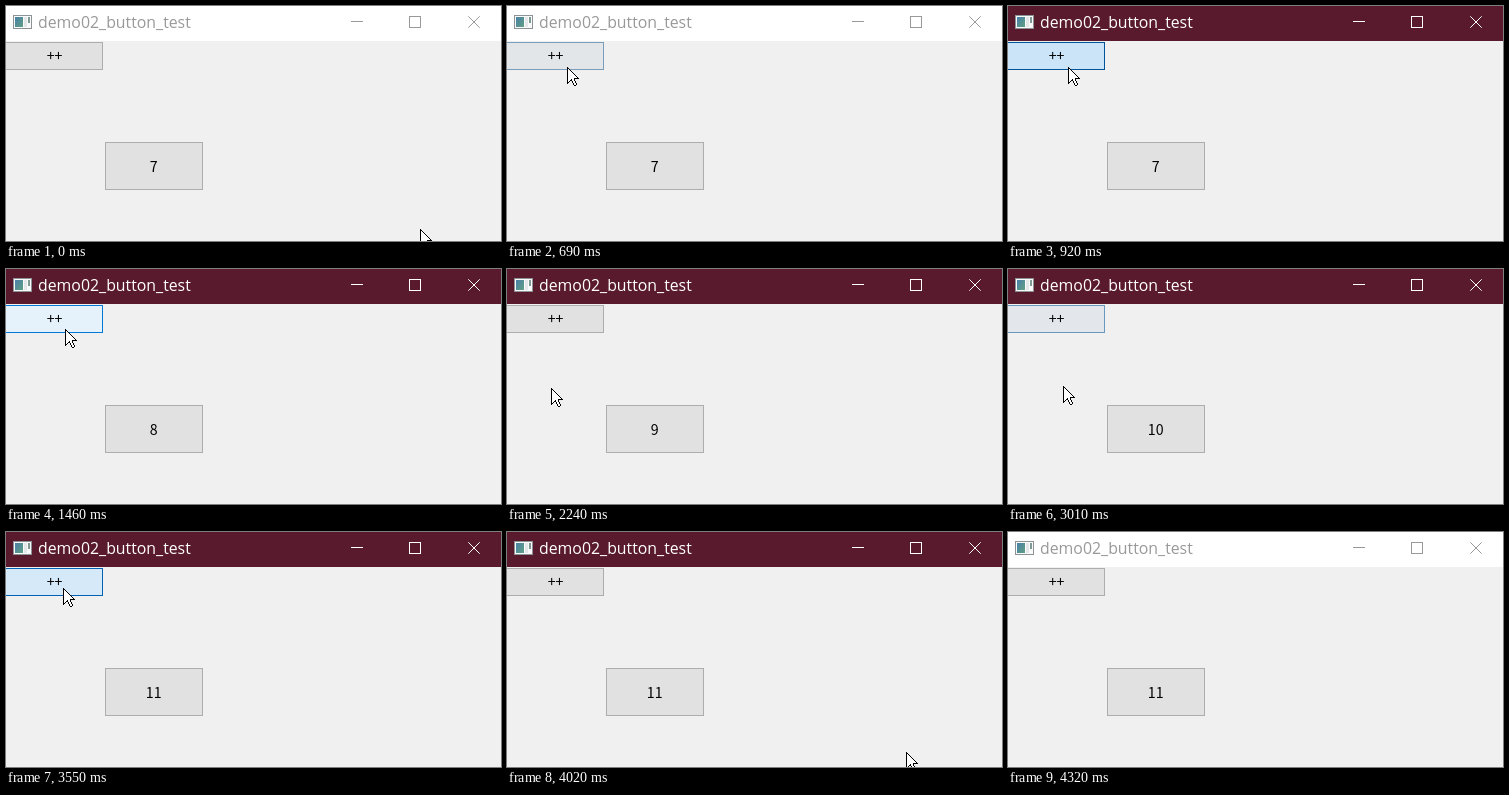
Animation, 495 px wide and 235 px high, one loop 4.4 s. Source, as an HTML page:

```html
<!DOCTYPE html>
<html lang="en">
<head>
<meta charset="utf-8">
<title>Button test</title>
<style>
  html, body { margin: 0; width: 100%; height: 100%; overflow: hidden; background: #f0f0f0; }
  svg { display: block; }
  .title { font: 15.85px "Open Sans", "Noto Sans", sans-serif; }
  .label { font: 14.2px "Noto Sans CJK SC", "Noto Sans CJK JP", "DejaVu Sans", sans-serif; text-anchor: middle; }
</style>
</head>
<body>
<svg width="495" height="235" viewBox="0 0 495 235">
  <defs>
    <linearGradient id="pane" x1="0" y1="0" x2="1" y2="1">
      <stop offset="0" stop-color="#4a7fa8"/>
      <stop offset="1" stop-color="#5fa083"/>
    </linearGradient>
  </defs>
  <rect width="495" height="235" fill="#f0f0f0"/>
  <rect id="bar" width="495" height="35"/>

  <g shape-rendering="crispEdges">
    <rect x="7.5" y="9.5" width="18" height="13" fill="#fafafa" stroke="#8c9296"/>
    <rect x="9" y="11" width="8" height="10" fill="url(#pane)"/>
    <rect x="18" y="11" width="3" height="10" fill="#e4e7e9"/>
    <rect x="22" y="11" width="2" height="6" fill="#7f9a94"/>
  </g>
  <text id="title" class="title" x="32" y="22">demo02_button_test</text>
  <g id="controls" fill="none">
    <path d="M345 15.5h12M403.5 10.5h11v11h-11z" shape-rendering="crispEdges"/>
    <path d="M462.3 10.3l11.4 11.4M473.7 10.3l-11.4 11.4"/>
  </g>

  <rect id="button" x="-.5" y="36.5" width="97" height="27"/>
  <text class="label" x="48.5" y="55">++</text>
  <rect x="99.5" y="136.5" width="97" height="47" fill="#e1e1e1" stroke="#adadad"/>
  <text id="count" class="label" x="147.7" y="166"></text>

  <path id="cursor" fill="#fff" stroke="#000" shape-rendering="crispEdges"
    d="M.5 .5V16.5L4.5 12.5L6.5 17.5L7.5 18.5H8.5L9.5 17.5L7.5 12.5V11.5H11.5Z"/>
</svg>
<script>
const LOOP = 4400, TICKS = 57, STEP = 77.2;
const $ = id => document.getElementById(id);

// Pointer stops: tick, x, y
const stops = [
  [0, 414, 223], [2, 422, 193], [3, 422, 193], [9, 60, 61], [18, 60, 61], [19, 59, 60],
  [25, 59, 60], [29, 44, 119], [33, 57, 60], [36, 57, 60], [39, 55, 117],
  [42, 57, 56], [46, 57, 56], [50, 340, 164], [53, 420, 240]
];
const presses = [11, 23, 34, 44], HOLD = 2;

// Idle, hover and pressed colours
const fills = [[225, 225, 225], [229, 241, 251], [204, 228, 247]];
const edges = [[173, 173, 173], [0, 120, 215], [0, 84, 153]];

const clamp = (v, lo, hi) => Math.min(hi, Math.max(lo, v));
const ease = p => p * p * (3 - 2 * p);

function pointer(k) {
  const i = stops.findIndex(s => s[0] > k);
  if (i < 0) return stops.at(-1).slice(1);
  const [t0, ...from] = stops[i - 1], [t1, ...to] = stops[i];
  const p = ease((k - t0) / (t1 - t0));
  return from.map((v, n) => Math.round(v + (to[n] - v) * p));
}

// The button fades towards its current state, faster when pressed
function nextLevel(level, k) {
  const [x, y] = pointer(k);
  const down = presses.some(p => k >= p && k < p + HOLD);
  const goal = down ? 2 : x < 97 && y < 64 ? 1 : 0;
  return level + clamp(goal - level, -.4, down ? 1 : .3);
}

const levels = [0];
for (let k = 1; k < TICKS; k++) levels[k] = nextLevel(levels[k - 1], k);

function shade(colors, level) {
  const i = level < 1 ? 0 : 1;
  const mix = colors[i].map((c, n) => Math.round(c + (colors[i + 1][n] - c) * (level - i)));
  return `rgb(${mix})`;
}

function draw(t) {
  const k = Math.min(TICKS - 1, Math.floor((t + 8) / STEP));
  const active = k >= presses[0] && k < TICKS - 1;
  $("cursor").setAttribute("transform", `translate(${pointer(k)})`);
  $("button").setAttribute("fill", shade(fills, levels[k]));
  $("button").setAttribute("stroke", shade(edges, levels[k]));
  $("count").textContent = 7 + presses.filter(p => k >= p + HOLD).length;
  $("bar").setAttribute("fill", active ? "#5a1a2d" : "#fff");
  $("title").setAttribute("fill", active ? "#fff" : "#999");
  $("controls").setAttribute("stroke", active ? "#fff" : "#999");
}

const start = performance.now();
function tick() {
  draw((performance.now() - start) % LOOP);
  requestAnimationFrame(tick);
}
tick();
</script>
</body>
</html>
```
